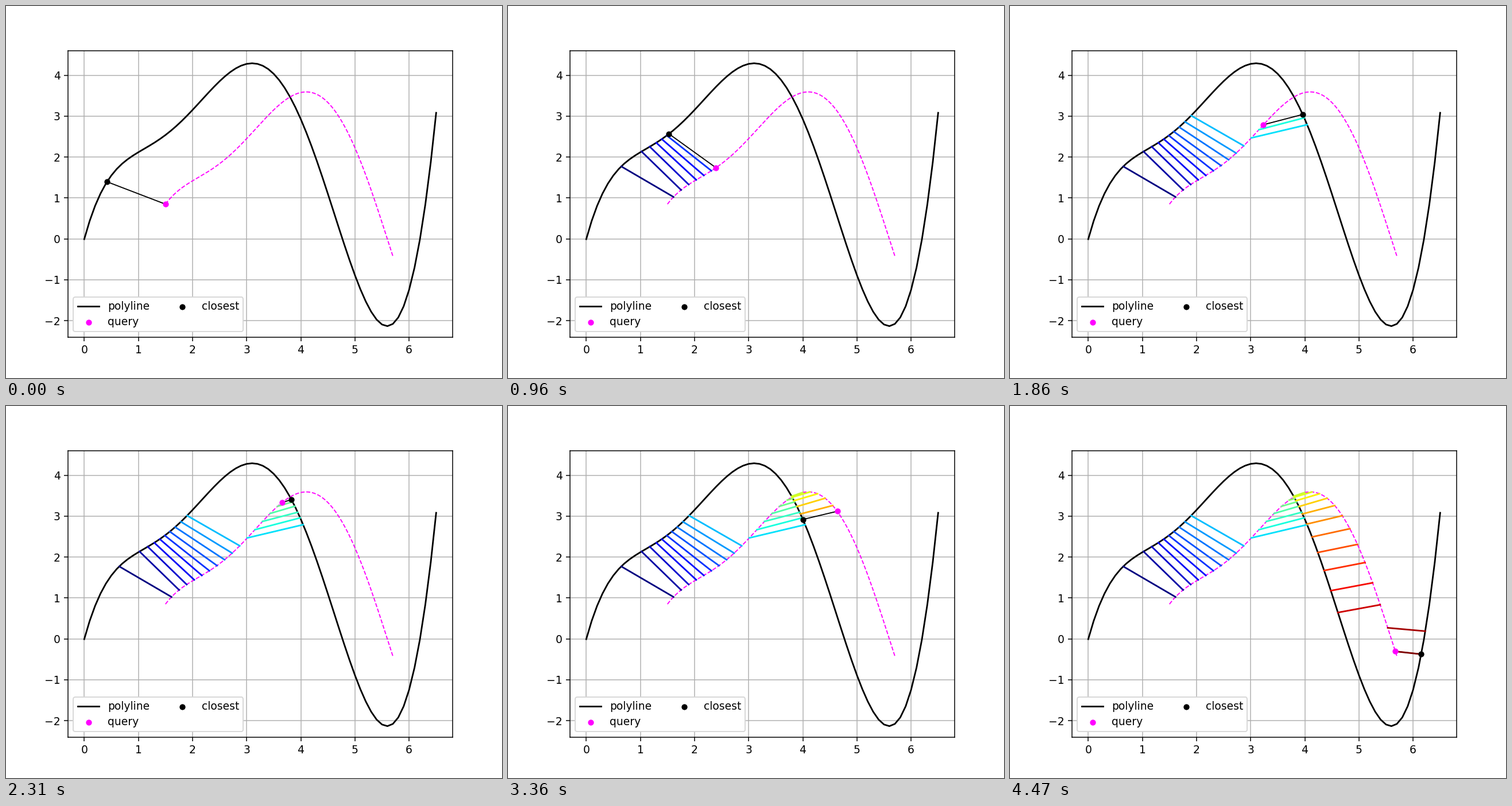
A matplotlib script for the animation above (4500 ms loop, 864 px wide and 648 px high).

```python
import numpy as np
import matplotlib.pyplot as plt
from matplotlib.animation import FuncAnimation

FRAMES = 150
INTERVAL = 30
TRAIL_STEP = 5

# Key points of the wave; a cubic plus two harmonics is fitted through them.
KEYS = np.array([(0, 0), (0.405, 1.349), (0.6, 1.70), (1, 2.13), (1.5, 2.553),
                 (2.242, 3.468), (3.1, 4.32), (3.636, 3.812), (4.171, 2.348),
                 (4.675, 0.381), (5.1, -1.22), (5.585, -2.123),
                 (6.152, -0.384), (6.5, 3.09)])


def basis(x):
    powers = [x ** n for n in range(4)]
    waves = [wave(n * x) for n in (1, 2) for wave in (np.sin, np.cos)]
    return np.column_stack(powers + waves)


WEIGHTS = np.linalg.lstsq(basis(KEYS[:, 0]), KEYS[:, 1], rcond=None)[0]


def curve(x):
    return basis(x) @ WEIGHTS


def query_path(x):
    """The same wave, moved right and down."""
    return np.column_stack([x, curve(x - 1) - 0.7])


def closest_point(p, line):
    """Project p on every segment of the line and keep the nearest result."""
    start, step = line[:-1], np.diff(line, axis=0)
    t = ((p - start) * step).sum(axis=1) / (step ** 2).sum(axis=1)
    spots = start + np.clip(t, 0, 1)[:, None] * step
    return spots[np.argmin(((spots - p) ** 2).sum(axis=1))]


xs = np.linspace(0, 6.5, 66)
polyline = np.column_stack([xs, curve(xs)])
queries = query_path(1.5 + 4.2 * np.arange(FRAMES) / FRAMES)
nearest = np.array([closest_point(q, polyline) for q in queries])

fig, ax = plt.subplots(figsize=(6.4, 4.8), dpi=135)
ax.set_xlim(-0.3, 6.8)
ax.set_ylim(-2.4, 4.6)
ax.grid(True)

ax.plot(*polyline.T, color="black", lw=1.5, label="polyline")
ax.plot(*query_path(np.linspace(1.5, 5.7, 151)).T, "--", color="magenta", lw=1)
link, = ax.plot([], [], color="black", lw=1)
query_dot = ax.scatter(*queries[0], s=20, color="magenta", zorder=3, label="query")
near_dot = ax.scatter(*nearest[0], s=20, color="black", zorder=3, label="closest")

stops = range(TRAIL_STEP - 1, FRAMES, TRAIL_STEP)
colors = plt.cm.jet(np.linspace(0, 1, len(stops)))
trail = []
for k, color in zip(stops, colors):
    ends = np.array([queries[k], nearest[k]])
    line, = ax.plot(*ends.T, color=color, lw=1.5, visible=False)
    trail.append((k, line))

ax.legend(loc="lower left", ncol=2, framealpha=1, edgecolor="0.84",
          labelspacing=0.4)


def update(i):
    link.set_data(*np.array([queries[i], nearest[i]]).T)
    query_dot.set_offsets([queries[i]])
    near_dot.set_offsets([nearest[i]])
    for k, line in trail:
        line.set_visible(k <= i)
    return []


anim = FuncAnimation(fig, update, frames=FRAMES, init_func=lambda: update(0),
                     interval=INTERVAL, repeat=True, repeat_delay=0)
plt.show()
```
